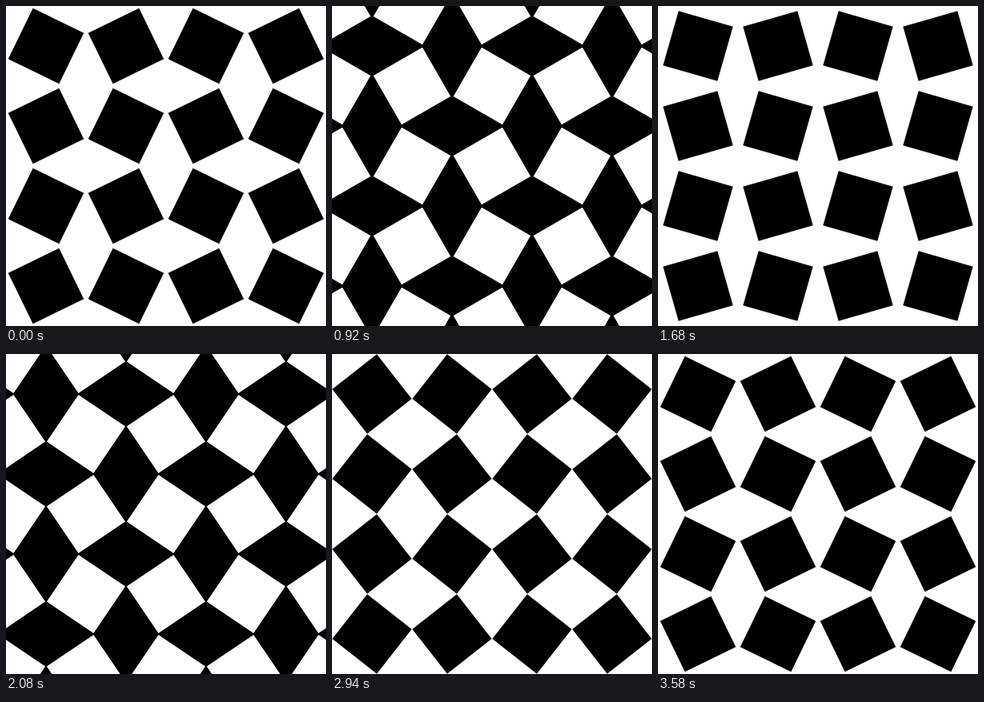
An HTML page with a canvas that plays this animation: 400x400 px, repeating every 3600 ms.

```html
<!DOCTYPE html>
<html lang="en">
<head>
<meta charset="utf-8">
<title>Turning squares</title>
<style>
  html, body { margin: 0; width: 100%; height: 100%; overflow: hidden; background: #fff; }
  canvas { display: block; width: 400px; height: 400px; }
</style>
</head>
<body>
<canvas id="stage" width="400" height="400"></canvas>
<script>
const ctx = document.getElementById("stage").getContext("2d");
const SIZE = 400, CELL = 100, RADIUS = CELL / 2;
const TICK = 20, TICKS = 180;
const START = 72.9, DEGREES_PER_TICK = 2;

function addSquare(x, y, degrees) {
  const a = degrees * Math.PI / 180;
  const dx = RADIUS * Math.sin(a), dy = RADIUS * Math.cos(a);
  ctx.moveTo(x + dx, y - dy);
  ctx.lineTo(x + dy, y + dx);
  ctx.lineTo(x - dx, y + dy);
  ctx.lineTo(x - dy, y - dx);
  ctx.closePath();
}

function drawGrid(offset, turn, color, background) {
  ctx.fillStyle = background;
  ctx.fillRect(0, 0, SIZE, SIZE);
  ctx.fillStyle = color;
  ctx.beginPath();
  for (let row = 0; row <= 4; row++) {
    for (let col = 0; col <= 4; col++) {
      const spin = (row + col) % 2 ? -turn : turn;
      addSquare(offset + col * CELL, offset + row * CELL, spin);
    }
  }
  ctx.fill();
}

function render(ms) {
  const tick = Math.floor(ms / TICK) % TICKS;
  // The closing pose is held for one tick at the seam of the loop.
  const angle = START + DEGREES_PER_TICK * (tick || -1);
  const turn = angle % 90;
  // Every quarter turn ends in a checkerboard, where figure and ground swap.
  if (Math.floor(angle / 90) % 2 === 0) drawGrid(RADIUS, turn, "#000", "#fff");
  else drawGrid(0, -turn, "#fff", "#000");
}

const began = performance.now();
function loop() {
  render(performance.now() - began);
  requestAnimationFrame(loop);
}
loop();
</script>
</body>
</html>
```
